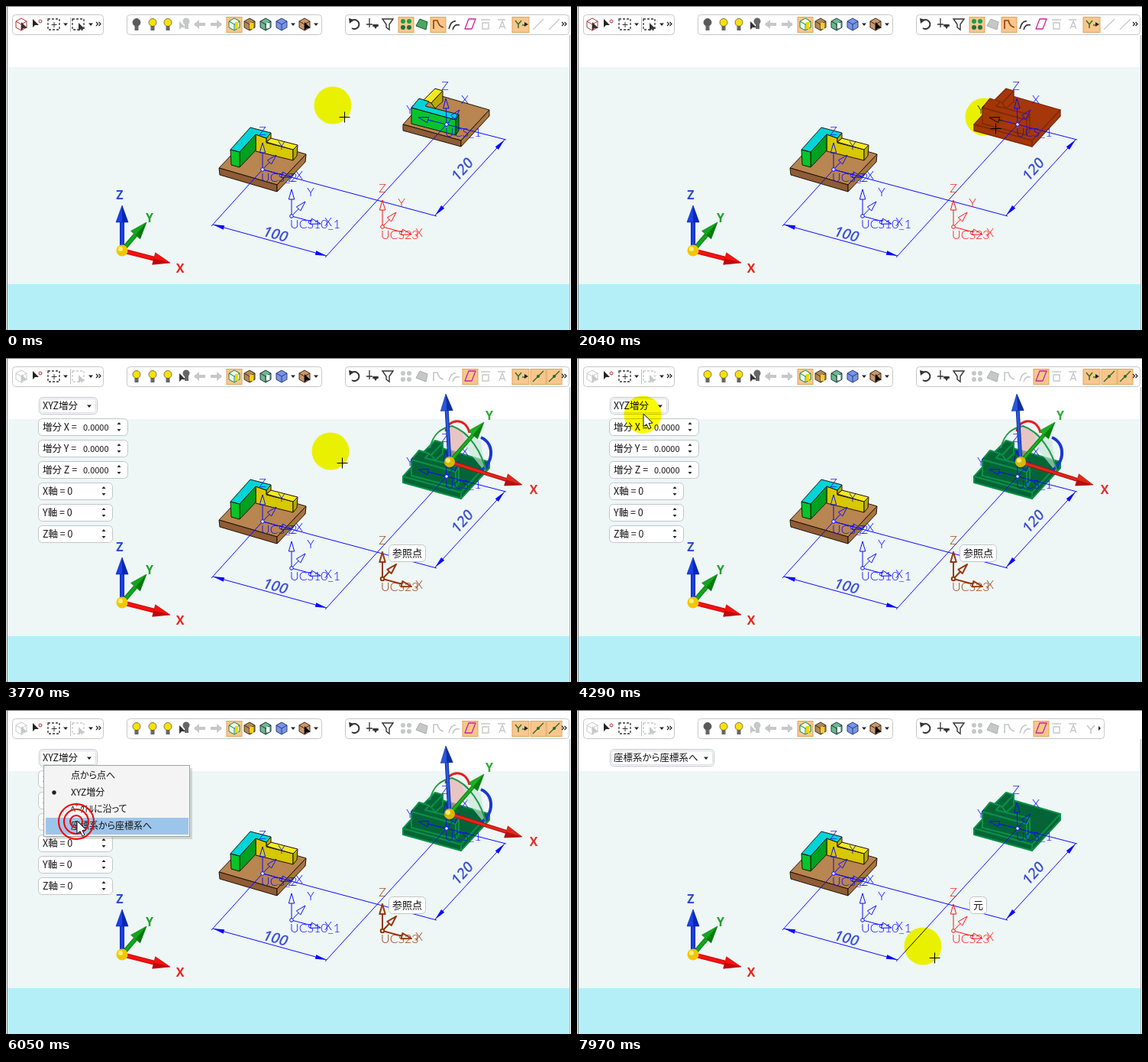
Write an HTML page that moves like this. It is 740 px wide and 424 px high and loops after 8000 ms.

```html
<!DOCTYPE html>
<html lang="ja">
<head>
<meta charset="utf-8">
<title>Coordinate system move</title>
<style>
html,body{margin:0;width:100%;height:100%;overflow:hidden;background:#fff}
svg{display:block;width:740px;height:424px}
text{white-space:pre}
.cad{font:300 16px Lato,sans-serif}
.dim{font:600 19px "Open Sans",sans-serif;fill:#3a50d2;text-anchor:middle}
.axis{font:700 16px "Open Sans",sans-serif;text-anchor:middle}
.ui{font:12.5px "Noto Sans CJK JP","Noto Sans CJK",sans-serif;font-feature-settings:"palt";fill:#111}
#spot{mix-blend-mode:multiply}
</style>
</head>
<body>
<svg id="stage" viewBox="0 0 740 424"></svg>
<script>
const LOOP = 8000, GREY = '#c6c8c8';
const BLUE = '#0a0aff', RED = '#ff1010', BROWN = '#96370a';

// drawing helpers
const g = (id, body, extra = '') => `<g id="${id}" ${extra}>${body}</g>`;
const poly = (pts, fill, stroke = 'none', w = 1) =>
  `<polygon points="${pts}" fill="${fill}" stroke="${stroke}" stroke-width="${w}" stroke-linejoin="round"/>`;
const path = (d, stroke, w = 1, fill = 'none', extra = '') =>
  `<path d="${d}" fill="${fill}" stroke="${stroke}" stroke-width="${w}" ${extra}/>`;
const rect = (x, y, w, h, fill, stroke = 'none', r = 0) =>
  `<rect x="${x}" y="${y}" width="${w}" height="${h}" rx="${r}" fill="${fill}" stroke="${stroke}"/>`;
const disc = (x, y, r, fill, stroke = 'none', w = 1) =>
  `<circle cx="${x}" cy="${y}" r="${r}" fill="${fill}" stroke="${stroke}" stroke-width="${w}"/>`;
const text = (cls, x, y, s, extra = '') => `<text class="${cls}" x="${x}" y="${y}" ${extra}>${s}</text>`;

function head(x0, y0, x1, y1, len, half) {
  const d = Math.hypot(x1 - x0, y1 - y0), ux = (x1 - x0) / d, uy = (y1 - y0) / d;
  const bx = x1 - ux * len, by = y1 - uy * len;
  const side = k => [bx - uy * half * k, by + ux * half * k];
  return { base: [bx, by], tip: [x1, y1], a: side(1), b: side(-1) };
}
function solidArrow(x0, y0, x1, y1, color, dark, w = 6, len = 22, half = 8) {
  const h = head(x0, y0, x1, y1, len, half);
  return path(`M${x0},${y0}L${h.base}`, dark, w) + path(`M${x0},${y0}L${h.base}`, color, w - 2) +
    poly([h.a, h.tip, h.b], color, dark, .6) + poly([h.a, h.tip, h.base], dark);
}
function ucs(x, y, name, color, axes, w = 1) {
  return axes.map(([dx, dy]) => {
    const h = head(x, y, x + dx, y + dy, 13, 3.7);
    return path(`M${x},${y}L${h.base}`, color, w) + poly([h.a, h.tip, h.b], 'none', color, w);
  }).join('') + disc(x, y, 2.3, '#eef6f6', color, w) + text('cad', x - 2, y + 16, name, `fill="${color}"`);
}
const AXES = [[0, -35], [18, -19], [38, 10]];
const LABELS = [[0, -51], [25, -32], [48, 7]];
const letters = (x, y, color, at = LABELS) => at.map(([dx, dy], i) =>
  text('cad', x + dx, y + dy + 6, 'ZYX'[i], `fill="${color}" text-anchor="middle"`)).join('');
function dimLine(x0, y0, x1, y1) {
  const a = head(x0, y0, x1, y1, 15, 2.8), b = head(x1, y1, x0, y0, 15, 2.8);
  return path(`M${x0},${y0}L${x1},${y1}`, BLUE) + poly([a.a, a.tip, a.b], BLUE) + poly([b.a, b.tip, b.b], BLUE);
}

// solid parts: [points, fill]
const WOOD = '#b98550', WOOD_L = '#8f5c36', WOOD_R = '#a87442';
const LEFT_PART = [
  ['279,212 317,172 393,194 355,234', WOOD], ['279,212 355,234 355,243 280,221', WOOD_L],
  ['355,234 393,194 392,204 355,243', WOOD_R],
  ['327,168 341,173 341,179 376,188 376,202 327,190', '#d8c800'],
  ['341,178 347,173 382,182 376,188', '#f2ea20'], ['376,188 382,182 381,196 376,202', '#b8aa00'],
  ['341,173 347,166 347,173 341,178', '#b8aa00'],
  ['306,191 327,168 327,189 306,211', '#00a020'], ['294,188 306,191 306,211 295,208', '#08c428'],
  ['294,188 320,159 347,166 341,173 327,168 306,191', '#00d4d8']
];
const RIGHT_PART = [
  ['520,155 557,114 633,136 596,176', WOOD], ['520,155 596,176 596,184 520,163', WOOD_L],
  ['596,176 633,136 633,144 596,184', WOOD_R],
  ['547,123 562,108 572,111 557,127', '#f0e820'], ['557,127 572,111 572,125 562,134', '#b8aa00'],
  ['531,133 589,149 589,169 531,154', '#08c428'], ['589,149 593,142 593,163 589,169', '#00901c'],
  ['531,133 541,121 554,125 549,131 593,142 589,149', '#00d4d8']
];
const solid = (faces, fill, stroke, w) => faces.map(f => poly(f[0], fill || f[1], stroke || '#1c1408', w)).join('');

// toolbar icons, all centred on y = 24
const cube = (x, c, line = '#333') =>
  poly(`${x - 7},20 ${x},16 ${x + 7},20 ${x + 7},28 ${x},32 ${x - 7},28`, c, line) +
  path(`M${x - 7},20L${x},24L${x + 7},20M${x},24V32`, line);
const bulb = (x, c) => disc(x, 21.5, 5, c, '#555', .8) + rect(x - 2.5, 26, 5, 6, '#666');
const pointer = (x, y, c = '#222') => poly(`${x},${y} ${x},${y + 11} ${x + 3},${y + 8} ${x + 8},${y + 8}`, c);
const dash = (x, c) => path(`M${x - 8},17h15v14h-15z`, c, 1.3, 'none', 'stroke-dasharray="3 2"');
const drop = (x, y = 24) => poly(`${x - 3},${y - 1.5} ${x + 3},${y - 1.5} ${x},${y + 2}`, '#222');
const more = x => path(`M${x - 3},21l2.5,2.5l-2.5,2.5m3.5,-5l2.5,2.5l-2.5,2.5`, '#222', 1.2);
const funnel = (x, c) => path(`M${x - 7},17h14l-5,7v7l-4,-3v-4z`, c, 1.4);
const bar = (x, w) => rect(x + .5, 11.5, w, 26, '#fff', '#c4c8ca', 4);
const hot = (x, w = 20) => rect(x - w / 2, 14.5, w, 20, '#f8c78e', '#dda45c');
const flow = (x, k, c) => path(`M${x - 7 * k},24h${14 * k}`, c, 4) + poly(`${x + 8 * k},24 ${x + k},18 ${x + k},30`, c);
const plane = (x, c, line) => poly(`${x - 8},26 ${x - 3},17 ${x + 7},21 ${x + 5},31`, c, line);
const curve = (x, c) => path(`M${x - 7},30q3,-11 9,-10M${x - 2},31q2,-8 9,-6`, c, 1.6);
const slant = (x, c) => poly(`${x - 7},30 ${x - 2},17 ${x + 7},17 ${x + 2},30`, 'none', c, 1.3);

function toolbar(s) {
  const move = s > 1, ink = '#333', on = (ok, c = ink) => ok ? c : GREY;
  let o = bar(8, 119) + cube(20, '#fff', on(!move, '#b03030')) + pointer(20, 21, on(!move)) +
    pointer(35, 17) + disc(45, 20, 2, 'none', '#c03030') +
    dash(63, ink) + path('M63,21v7m-3.5,-3.5h7', ink) + drop(78) + path('M84.5,15v19', '#bbb') +
    dash(95, on(!move)) + pointer(95, 22, on(!move)) + drop(111) + more(121);

  o += bar(158, 255) + bulb(171, s === 2 ? '#ffe100' : '#5a5a5a') + bulb(192, '#ffe100') + bulb(212, '#ffe100');
  const pick = s === 1 || s === 2;
  o += disc(236, 20, 4.5, on(pick, '#666')) + rect(234, 24, 5, 6, on(pick, '#666')) + pointer(227, 20, on(pick)) +
    flow(254, -1, GREY) + flow(275, 1, GREY) + hot(299) + cube(299, '#e8fff0', '#188050') + rect(300, 21, 4, 9, '#f4d800') +
    cube(319, '#b08858', '#4a3018') + rect(319, 22, 5, 8, '#f0d020') + cube(340, '#6cb88c', '#234') + rect(341, 22, 4, 7, '#fff') +
    cube(361, '#7894e4', '#2c3c80') + drop(376) + cube(391, '#c8986c', '#402810') + pointer(391, 21, '#000') + drop(406);

  o += bar(444, s === 3 ? 246 : 293) +
    path('M452,20a6,6 0 1 1 1,9', ink, 2) + poly('449,16 456,18 450,23', ink) +
    path('M472,24h8m-4,-8v12m4,-2h8', ink, 1.3) + poly('480,24 488,24 484,30', ink) + funnel(500, ink);
  if (!move) o += hot(524) + hot(566);
  for (const [dx, dy] of [[-4, -4], [4, -4], [-4, 4], [4, 4]])
    o += disc(524 + dx, 24 + dy, 3, on(!move, dy < 0 ? '#18a048' : '#207040'));
  o += plane(545, on(s === 0, '#48a860'), s === 0 ? '#205030' : '#aaa') +
    path('M560,30v-11h5q2,8 8,9', on(!move, '#a04010'), 1.7) + curve(587, on(!move));
  if (move) o += hot(608);
  o += slant(608, '#d020a0') +
    path('M622,18h12m-10,4h8v8h-8zM644,18h10m-8,12l4,-10l4,10m-7,-3h6', GREY, 1.4);
  if (s === 3) return o + path('M668,20l5,6l5,-6m-5,6v5', GREY, 1.6) + poly('683,21 683,27 686,24', '#222');
  o += hot(674, 22) + path('M667,19l4,5l4,-5m-4,5v5m5,-4h4', '#357030', 1.5) + poly('679,21 684,24 679,27', '#222');
  if (s === 2) o += hot(697) + hot(718);
  return o + path('M690,31l14,-14M711,31l14,-14', s === 2 ? '#406030' : GREY, 1.4) +
    (s === 2 ? disc(697, 24, 2, '#207020') + disc(718, 24, 2, '#207020') : '') + more(731);
}

// panels
const field = (x, y, w, h = 22) => rect(x + .5, y + .5, w, h, '#fff', '#c2c6c8', 5);
function spin(i) {
  const y = 79 + i * 28, name = 'XYZ'[i % 3], x = i < 3 ? 148 : 128;
  return field(42, y, i < 3 ? 117 : 97) +
    (i < 3 ? text('ui', 48, y + 16, `増分 ${name} =`) + text('ui', 101, y + 15.5, '0.0000', 'style="font-size:11px"')
           : text('ui', 48, y + 16, `${name}軸 = 0`)) +
    poly(`${x - 2.5},${y + 8} ${x + 2.5},${y + 8} ${x},${y + 5}`, '#222') +
    poly(`${x - 2.5},${y + 14} ${x + 2.5},${y + 14} ${x},${y + 17}`, '#222');
}
const combo = (w, s, ax) => field(43, 51, w) + rect(45.5, 53.5, w - 4, 18, '#fff', '#d8dcde', 3) + text('ui', 48, 67, s) + drop(ax, 63);
const ITEMS = ['点から点へ', 'XYZ増分', 'ﾍﾞｸﾄﾙに沿って', '座標系から座標系へ'];
const menu = rect(52, 76, 192, 93, '#0002') + rect(49.5, 72.5, 191, 93, '#f4f4f4', '#a0a0a0') +
  '<rect id="row" x="52" width="187" height="22" fill="#9cc5ec"/>' + disc(63, 108, 2.7, '#222') +
  ITEMS.map((s, i) => text('ui', 85, 90 + i * 22, s, 'style="font-size:12px"')).join('');
const tag = (x, w, s) => rect(x + .5, 244.5, w, 22, '#fff', '#c2c6c8', 5) +
  text('ui', x + w / 2 + .5, 260, s, 'text-anchor="middle" style="font-size:13px"');

function sideBar() {
  const c = '#858f8e', green = '#6fae86';
  const at = (y, s) => `<g transform="translate(32 ${y})">${s}</g>`;
  const box = f => poly('-7,-3 0,-7 7,-3 7,5 0,8 -7,5', f, c) + path('M-7,-3L0,1L7,-3M0,1V8', c);
  const lock = f => rect(-7, -2, 13, 9, f, c) + disc(0, 3, 2.5, '#e4eaea', c) + path('M-5,-5h8l4,-3', c, 1.5);
  return rect(10.5, 116.5, 40, 299, '#dfe6e6', '#c8cfcf', 8) +
    at(138, rect(-1, -7, 7, 14, '#a8d0b4', c) + path('M-7,-2q-1,6 4,8m-3,-13v6h6', c, 1.5)) +
    at(174, rect(-7, -7, 9, 9, '#a8d0b4', c) + disc(1, 1, 5, '#e8f0f0', c, 1.5) + path('M5,5l4,4', c, 2)) +
    at(210, path('M-8,1q8,-11 16,0M-8,1v-6m0,6h6', c, 1.6) + disc(0, 5, 2, '#e08080')) +
    at(247, rect(-8, -7, 16, 14, green, c) + path('M-4,-7v14M1,-7v14M-8,-2l16,4', '#d4e8dc')) +
    at(283, lock('#d0d6d6')) + at(320, lock(c)) +
    at(356, path('M-8,-6l14,6l-14,6m0,-14v16M6,-6q3,6 0,12', c, 1.5) + disc(0, 0, 3, green)) +
    at(392, box('#a4acac')) +
    flow(138, -1, '#a4acac').replaceAll('24', '194').replaceAll('18"', '190"').replace(',18 ', ',190 ').replace(',30"', ',198"');
}
const navArrow = (x, k) => path(`M${x - 6 * k},194h${8 * k}`, '#a0a8a8', 3, 'none', 'stroke-dasharray="2 1"') +
  poly(`${x + 7 * k},194 ${x + k},190 ${x + k},198`, '#a0a8a8');
const navRing = disc(151.5, 319, 50, '#ffffff40', '#c3c9c9', 5) +
  [[100, 303], [125, 347], [152, 367]].map(([x, y]) => solidArrow(152, 320, x, y, '#cdd2d2', '#b9c0c0', 5, 18, 7)).join('');

const axis = (x, y, s, c) => text('axis', x, y + 6, s, `fill="${c}"`);
const triad = solidArrow(152, 320, 152, 261, '#1840e8', '#0828b0') + solidArrow(152, 320, 184, 283, '#10a818', '#087810') +
  solidArrow(152, 320, 215, 336, '#f81010', '#c00808') + disc(152, 320, 7.5, '#f0c800') + disc(150, 318, 3, '#fff080') +
  axis(149, 247, 'Z', '#2850d0') + axis(188, 277, 'Y', '#20a028') + axis(228, 343, 'X', '#e82018');

const handles = poly('577,92 584,88 606,100 597,122 581,134', '#e8a8a8a0') + poly('597,97 622,108 628,150 604,120', '#c8e8d8a0') +
  path('M576,96C578,80 602,76 607,98', '#e02020', 3) + path('M622,104C642,112 638,142 618,149', '#1838d0', 4) +
  path('M555,118C560,98 570,92 584,89C606,96 624,124 629,150', '#209848', 2) +
  solidArrow(581, 136, 576, 47, '#2858e0', '#1030a0', 5) + solidArrow(581, 136, 626, 84, '#18b020', '#0a8010', 5) +
  solidArrow(581, 136, 676, 166, '#e02818', '#b01010', 5) + disc(581, 136, 7, '#d8b800') + disc(579, 134, 3, '#f4e880') +
  axis(633, 75, 'Y', '#30a838') + axis(691, 172, 'X', '#e03028');

const dims = path('M336,214L269,288M577,155L418,329M336,214L564,275M577,155L655,175', BLUE) +
  dimLine(271, 286, 420, 327) + dimLine(562, 274, 653, 175) +
  text('dim', 0, 6, '100', 'transform="translate(353 299) rotate(15) skewX(-12)"') +
  text('dim', 0, 6, '120', 'transform="translate(598 214) rotate(-48) skewX(-8)"');
const AXES_R = [[-1, -34], [-37, -9], [17, -19]], LABELS_R = [[-2, -51], [-48, -20], [24, -33]];
const GLOW = '518,156 530,130 547,118 561,106 575,111 634,135 635,146 597,187 518,164';

const stage = document.getElementById('stage');
stage.innerHTML =
  rect(0, 0, 740, 424, '#fff') + rect(2, 80, 736, 284, '#eef6f6') + rect(2, 364, 736, 60, '#b4eff8') +
  rect(0, 0, 740, 1, '#777') + rect(1, 0, 1, 424, '#777') + rect(738, 38, 1, 386, '#aab0b2') +
  [0, 1, 2, 3].map(s => g('bar' + s, toolbar(s))).join('') +
  g('side', sideBar().replace(/<path d="M145[\s\S]*$/, '') + navArrow(138, -1) + navArrow(168, 1) + navRing) + triad +
  solid(LEFT_PART) + g('plain', solid(RIGHT_PART)) + g('picked', solid(RIGHT_PART, '#a5370a', '#7c2a06', 1.3)) +
  g('chosen', solid(RIGHT_PART, '#046437', '#0a9046', 2)) + dims +
  ucs(336, 214, 'UCS_2', BLUE, AXES) + letters(336, 214, BLUE) +
  ucs(374, 275, 'UCS10_1', BLUE, AXES) + letters(374, 275, BLUE) +
  ucs(577, 155, 'UCS_1', BLUE, AXES_R) +
  g('hover', poly(GLOW, '#58e058', '#a4f0a4', 3) + solid(RIGHT_PART, '#12d412', '#20c020', 1.5)) + letters(577, 155, BLUE, LABELS_R) +
  g('red', ucs(493, 289, 'UCS23', RED, AXES) + letters(493, 289, RED)) +
  g('brown', ucs(493, 289, 'UCS23', BROWN, AXES, 2) + letters(493, 289, BROWN, LABELS.slice(1).length ? [LABELS[0]] : []) +
    text('cad', 541, 302, 'X', `fill="${BROWN}" text-anchor="middle"`)) +
  g('step', handles + combo(76, 'XYZ増分', 109) + [0, 1, 2, 3, 4, 5].map(spin).join('') + tag(501, 48, '参照点')) +
  g('frame', combo(136, '座標系から座標系へ', 169) + tag(514, 22, '元')) + g('menu', menu) +
  disc(0, 0, 24.5, '#fafa00').replace('<circle', '<circle id="spot"') +
  g('mouse',
    g('rings', [8, 16, 23].map(r => disc(0, 0, r, 'none', '#f00000', 2)).join('')) +
    g('small', disc(0, 0, 10, 'none', '#f00000', 2)) +
    g('cross', path('M8.5,15.5h14M15.5,8.5v14', '#000')) +
    g('busy', disc(15.5, 16, 8, 'none', '#2f8ae0', 4) + disc(15.5, 16, 8, 'none', '#70b8f0', 1)) +
    g('arrow', poly('1,-1 1,16 5,12.5 8,19 11,17.5 8,11.5 13,11', '#fff', '#111')) +
    g('badge', poly('13,20 18,15 28,18 28,25 23,30 13,27', '#111') + path('M14,21l9,3l4,-5', '#fff')));

// pointer path: time, x, y
const PATH = [[0, 428, 130], [960, 428, 130], [1170, 546, 148], [1950, 546, 148], [2370, 435, 123], [3710, 435, 123],
  [4290, 86, 74], [4440, 100, 67], [4900, 100, 66], [5220, 86, 112], [5370, 89, 138], [5400, 89, 138],
  [5750, 92, 146], [7310, 92, 146], [7640, 546, 275], [7970, 453, 309], [LOOP, 453, 309]];
function spotAt(t) {
  const i = PATH.findIndex(p => p[0] > t), [a, x0, y0] = PATH[i - 1], [b, x1, y1] = PATH[i];
  const k = Math.floor((t - a) / 30) * 30 / (b - a), e = k * k * (3 - 2 * k);
  return [Math.round(x0 + (x1 - x0) * e), Math.round(y0 + (y1 - y0) * e)];
}

// visible spans in ms
const SHOW = {
  bar0: [[0, 2010]], bar1: [[2010, 3290]], bar2: [[3290, 6260]], bar3: [[6260, LOOP]],
  plain: [[0, 1110]], hover: [[1110, 2040]], picked: [[2040, 3290]], chosen: [[3290, LOOP]],
  red: [[0, 3290], [6260, LOOP]], brown: [[3290, 6260]], step: [[3290, 6260]], frame: [[6260, LOOP]],
  side: [[3980, 4200], [6350, 7430]], menu: [[4750, 6230]],
  rings: [[1590, 1950], [4600, 4720], [6050, 6200], [7010, 7310]], small: [[6710, 7010]],
  cross: [[0, 1110], [2040, 2930], [3230, 4140], [6260, LOOP]], busy: [[2930, 3230]],
  arrow: [[1110, 2040], [4140, 6260]], badge: [[1110, 2040]]
};
const el = id => document.getElementById(id);
const nodes = Object.entries(SHOW).map(([id, spans]) => [el(id), spans]);
const within = (t, spans) => spans.some(([a, b]) => t >= a && t < b);
const spot = el('spot'), mouse = el('mouse'), row = el('row');

function draw(t) {
  for (const [node, spans] of nodes) node.style.display = within(t, spans) ? '' : 'none';
  const [x, y] = spotAt(t), shift = `translate(${x} ${y})`;
  spot.setAttribute('transform', shift);
  mouse.setAttribute('transform', shift);
  spot.style.display = within(t, SHOW.rings) ? 'none' : '';
  row.setAttribute('y', 75 + 22 * (y < 76 ? 1 : Math.min(3, Math.floor((y - 75) / 22))));
}
const start = performance.now();
function tick() {
  draw((performance.now() - start) % LOOP);
  requestAnimationFrame(tick);
}
tick();
</script>
</body>
</html>
```
